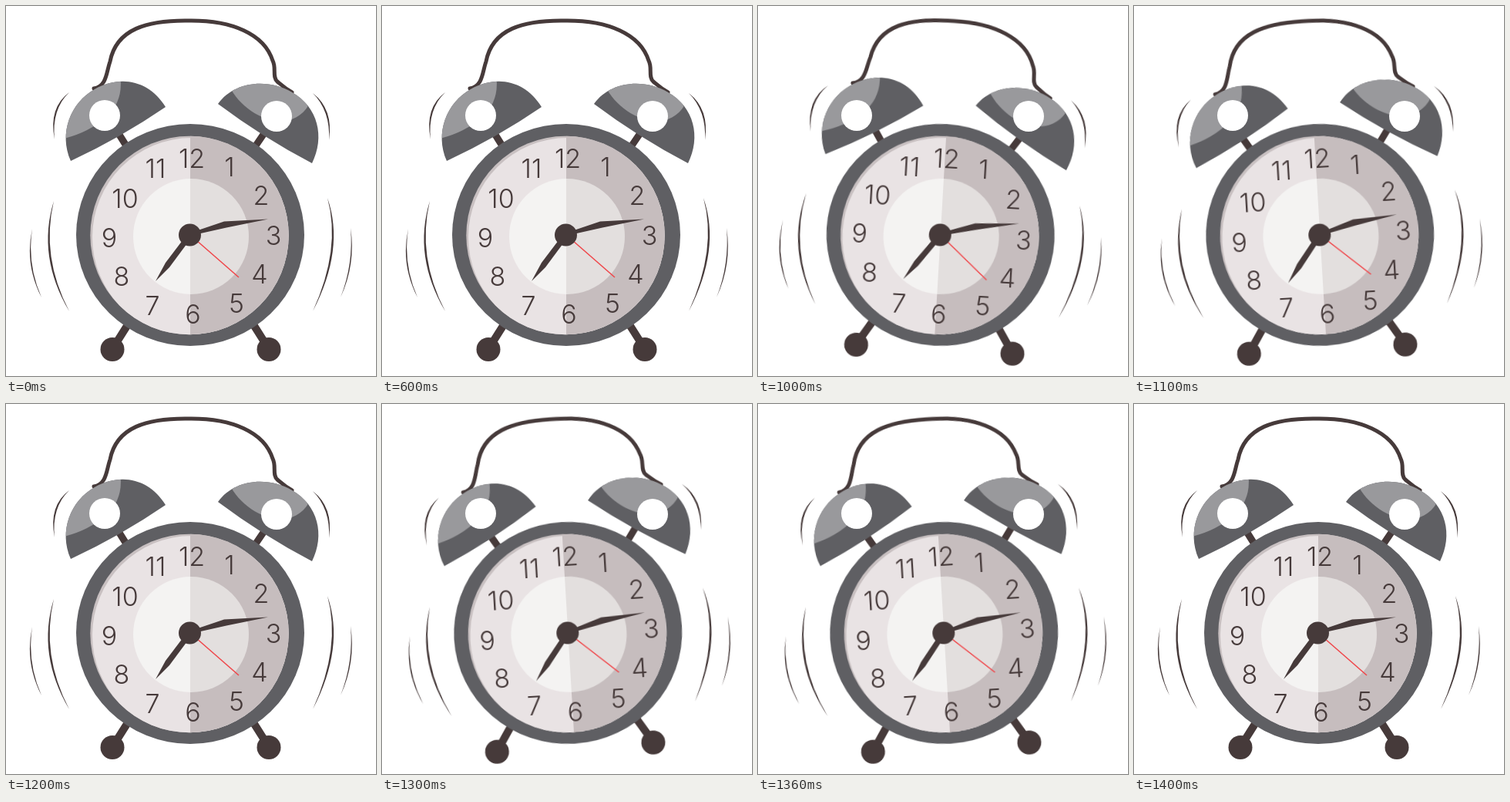
Animation, 480 px wide and 480 px high, one loop 1500 ms. Source, as an HTML page without scripts:

```html
<!DOCTYPE html>
<html lang="en">
<head>
<meta charset="utf-8">
<title>Ringing alarm clock</title>
<style>
  html, body { margin: 0; width: 100%; height: 100%; overflow: hidden; background: #fff; }
  svg { display: block; width: 100%; height: 100%; }

  .clock { transform-origin: 239px 258px; animation: ring 1.5s step-end infinite; }
  .ink { fill: #463a3a; }
  .line { fill: none; stroke: #463a3a; }
  .metal { fill: #5f5f63; }
  .shine { fill: #99999c; }
  .digits { font: 300 34px Inter, "Open Sans", sans-serif; text-anchor: middle; }

  /* long rest, then a short burst of hard swings */
  @keyframes ring {
    0%, 80%, 93.333%, 100% { transform: rotate(0deg); }
    66.666% { transform: rotate(3.3deg); }
    73.333%, 86.666% { transform: rotate(-3.4deg); }
  }
</style>
</head>
<body>
<svg viewBox="0 0 480 480">
  <defs>
    <path id="bellL" d="M84 201C68 165 84 125 115 108C150 88 187 98 207 131Q148.500 171 84 201Z"/>
    <path id="bellR" d="M275 127C297 97 340 94 371 112C405 131 414 170 397 204Q333 170.500 275 127Z"/>
    <clipPath id="clipL"><use href="#bellL"/></clipPath>
    <clipPath id="clipR"><use href="#bellR"/></clipPath>
    <clipPath id="rightHalf"><rect x="239" y="150" width="150" height="300"/></clipPath>
    <clipPath id="dial"><circle cx="238" cy="297.500" r="128.700"/></clipPath>
  </defs>

  <g class="clock">
    <!-- vibration marks -->
    <g class="ink">
      <path d="M62 253Q40 325 82 396Q45 325 62 253Z"/>
      <path d="M34 289Q24 335 46 378Q27 335 34 289Z"/>
      <path d="M82 112Q55 132 63 173Q59 134 82 112Z"/>
      <path d="M417 249Q440 315 398 396Q435 315 417 249Z"/>
      <path d="M447 288Q454 335 434 378Q451 335 447 288Z"/>
      <path d="M398 113Q425 134 419 174Q421 136 398 113Z"/>
    </g>

    <!-- handle, stems and feet -->
    <path class="line" stroke-width="5" stroke-linecap="round"
      d="M114 107C131 104 130 86 135 72C143 30 183 18 238 19C293 18.500 335 36 346 71C351 80 345 92 352 98S362 107 371 112"/>
    <path class="line" stroke-width="9" d="M144.500 163L159.500 187M335 165L320 187"/>
    <path class="line" stroke-width="10" d="M159.500 411L138 445M319.500 411L341 445"/>
    <g class="ink">
      <circle cx="138" cy="445.500" r="15.500"/>
      <circle cx="341" cy="445.500" r="15.500"/>
    </g>

    <!-- bells -->
    <use href="#bellL" class="metal"/>
    <path class="shine" clip-path="url(#clipL)" d="M70 173Q105 166 130 144Q153 123 148 90L70 90Z"/>
    <use href="#bellR" class="metal"/>
    <path class="shine" clip-path="url(#clipR)" d="M290 104C308 143 368 170 393 128L380 90H290Z"/>

    <!-- case and dial -->
    <ellipse class="metal" cx="239" cy="297" rx="148" ry="144"/>
    <g clip-path="url(#dial)">
      <circle cx="238" cy="297" r="130" fill="#c8c0c1"/>
      <circle cx="241" cy="300" r="129" fill="#e9e3e4"/>
      <circle cx="240" cy="299" r="75" fill="#f4f3f2"/>
      <g clip-path="url(#rightHalf)">
        <circle cx="238" cy="297" r="130" fill="#c6bdbe"/>
        <circle cx="240" cy="299" r="75" fill="#e3dfde"/>
      </g>
    </g>

    <g class="digits ink">
      <text x="241" y="210">12</text>
      <text x="290" y="221">1</text>
      <text x="331" y="258">2</text>
      <text x="347" y="310">3</text>
      <text x="329" y="360">4</text>
      <text x="299" y="398">5</text>
      <text x="242.500" y="412">6</text>
      <text x="190" y="401">7</text>
      <text x="150" y="363">8</text>
      <text x="134" y="313">9</text>
      <text x="154.500" y="262">10</text>
      <text x="194" y="223">11</text>
    </g>

    <!-- hands -->
    <path stroke="#f0474b" stroke-width="1.600" d="M239 297L302 352"/>
    <g class="ink">
      <path d="M246 292L283 279.500L340 276.500L286 287.500L248 296Z"/>
      <path d="M229 304L207 333L194 357L212 339L235 308Z"/>
      <circle cx="238.500" cy="297" r="14.500"/>
    </g>
  </g>

  <!-- badges stay still while the bells shake -->
  <g fill="#fff">
    <circle cx="128" cy="142" r="20"/>
    <circle cx="351" cy="143" r="20"/>
  </g>
</svg>
</body>
</html>
```
